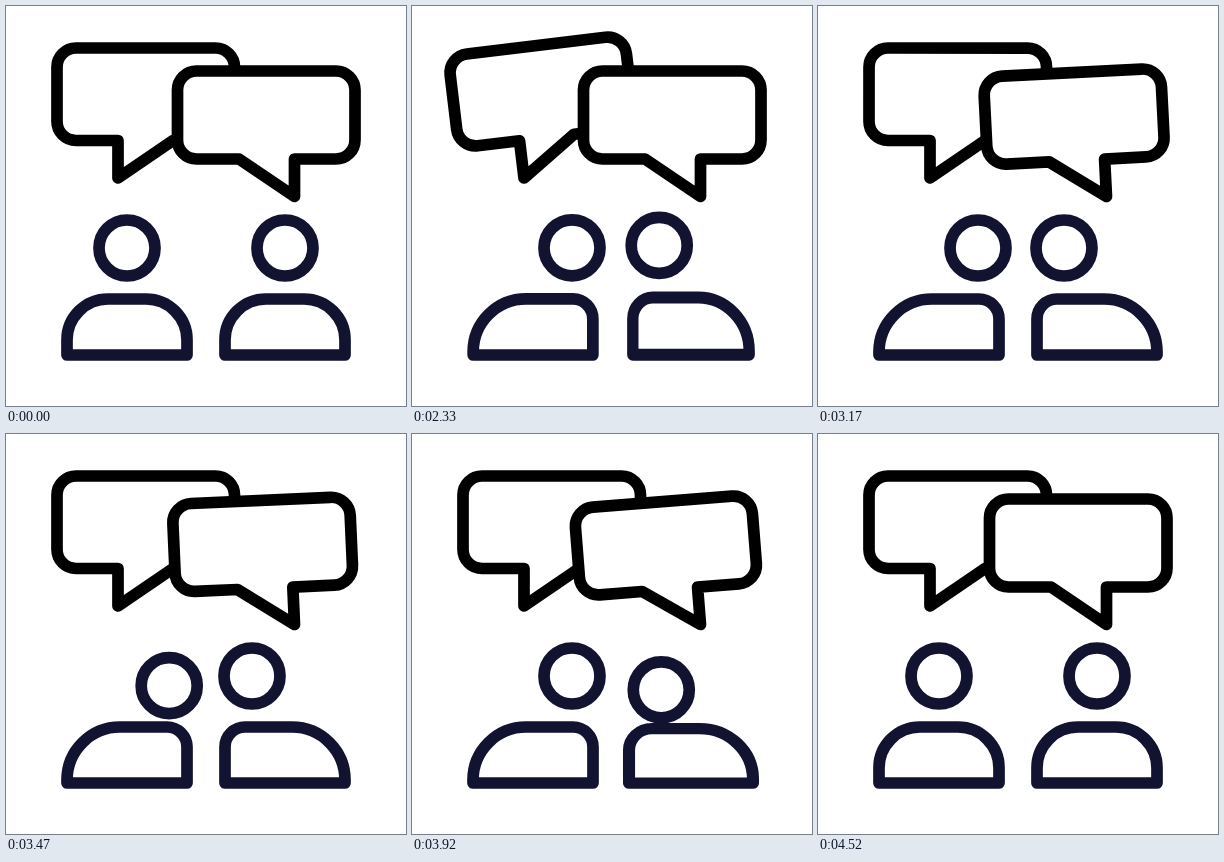
An HTML page with a canvas that plays this animation: 400 by 400 pixels, repeating every 4550 ms.

```html
<!DOCTYPE html>
<html lang="en">
<head>
<meta charset="utf-8">
<style>
  html, body { margin: 0; height: 100%; overflow: hidden; background: #fff; }
  canvas { display: block; width: 100vmin; height: 100vmin; }
</style>
</head>
<body>
<canvas id="stage" width="400" height="400"></canvas>
<script>
const ctx = document.getElementById('stage').getContext('2d');
const LOOP = 4550, START = 2030, STEP = 30, BEAT = 238;

// Cosine-eased value through [time, value] keys
function track(t, keys) {
  if (t <= keys[0][0]) return keys[0][1];
  for (let i = 1; i < keys.length; i++) {
    const [t0, a] = keys[i - 1], [t1, b] = keys[i];
    if (t < t1) return a + (b - a) * (1 - Math.cos(Math.PI * (t - t0) / (t1 - t0))) / 2;
  }
  return keys[keys.length - 1][1];
}

// Damped swing of a speech bubble, in degrees
const SWING = [0, -20.3, 14.3, -8.7, 3.4, 0].map((angle, i) => [i * BEAT, angle]);

const turn = t => track(t, [[0, 0], [285, 1]]);
const squash = t => track(t, [[0, 0], [110, 4], [250, -2], [360, 0]]);

function nod(t, count) {
  const half = 245;
  if (t <= 0 || t >= 2 * half * count) return 0;
  return 11 * (1 - Math.cos(Math.PI * t / half)) / 2;
}

function mirrored(flip, draw) {
  ctx.save();
  if (flip) {
    ctx.translate(400, 0);
    ctx.scale(-1, 1);
  }
  draw();
  ctx.restore();
}

function bubble(t, { flip, tipX, tipY, height, start }) {
  mirrored(flip, () => {
    const left = 51 - tipX, right = 228.5 - tipX, bottom = -37.5, top = bottom - height, r = 19;
    const angle = track(t - start, SWING) * Math.PI / 180;
    ctx.translate(tipX, tipY);
    ctx.rotate(flip ? -angle : angle);
    ctx.beginPath();
    ctx.moveTo(0, 0);
    ctx.lineTo(0, bottom);
    ctx.arcTo(left, bottom, left, top, r);
    ctx.arcTo(left, top, right, top, r);
    ctx.arcTo(right, top, right, bottom, r);
    ctx.arcTo(right, bottom, 0, bottom, r);
    ctx.lineTo(167 - tipX, bottom);
    ctx.closePath();
    ctx.fillStyle = '#fff';
    ctx.strokeStyle = '#000';
    ctx.fill();
    ctx.stroke();
  });
}

function person(t, { flip, reach, lean, turnIn, turnOut, nodStart, nods }) {
  mirrored(flip, () => {
    const p = turn(t - turnIn) - turn(t - turnOut);
    const s = squash(t - turnIn) + squash(t - turnOut);
    const dip = nod(t - nodStart, nods);
    ctx.strokeStyle = '#121331';

    ctx.beginPath();
    ctx.arc(121 + reach * p + lean * dip, 242 + 1.3 * s + dip, 28, 0, 2 * Math.PI);
    ctx.stroke();

    ctx.translate(121, 355);
    ctx.scale(1 + s / 66, 1 - s * 0.012);
    ctx.beginPath();
    ctx.roundRect(-60, -62, 120, 56, [41 + 12 * p, 41 - 21 * p, 0, 0]);
    ctx.stroke();
  });
}

const bubbles = [
  { flip: false, tipX: 112, tipY: 172, height: 92.5, start: 1990 },
  { flip: true, tipX: 111.5, tipY: 190.5, height: 88, start: 3111 }
];
const people = [
  { flip: false, reach: 39, lean: 0.33, turnIn: 1990, turnOut: 4090, nodStart: 2680, nods: 2 },
  { flip: true, reach: 33, lean: 0, turnIn: 2080, turnOut: 3862, nodStart: 3680, nods: 1 }
];

function frame(now) {
  const time = now % LOOP;
  const t = time < START ? 0 : START + Math.floor((time - START) / STEP) * STEP;
  ctx.fillStyle = '#fff';
  ctx.fillRect(0, 0, 400, 400);
  ctx.lineWidth = 11.7;
  ctx.lineJoin = ctx.lineCap = 'round';
  bubbles.forEach(b => bubble(t, b));
  people.forEach(p => person(t, p));
  requestAnimationFrame(frame);
}

const origin = performance.now();
frame(0);
function tick() {
  requestAnimationFrame(tick);
}
</script>
</body>
</html>
```
